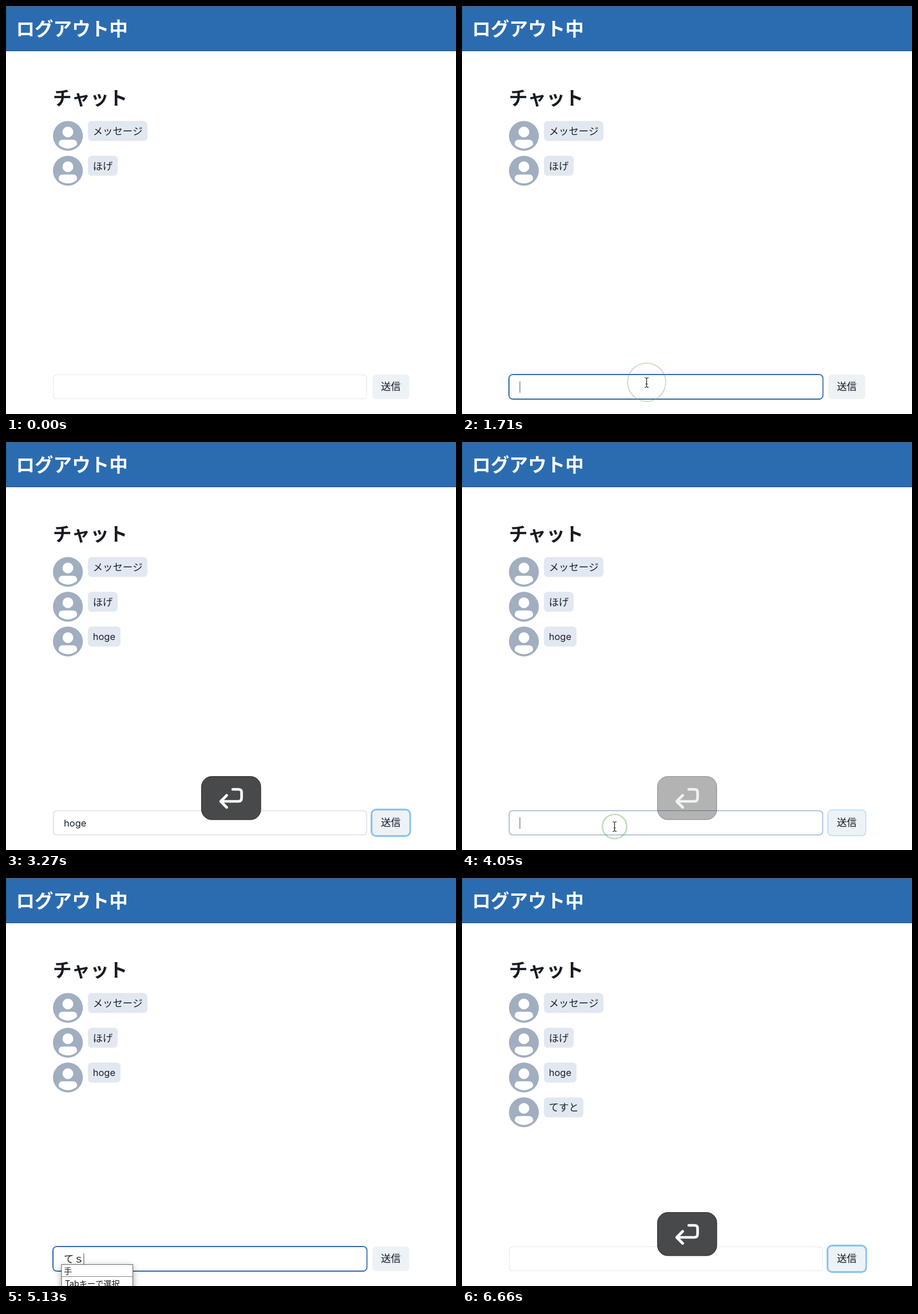
Animation, 786 px wide and 713 px high, one loop 6780 ms. Source, as an HTML page with a canvas:

```html
<!DOCTYPE html>
<html lang="ja">
<head>
<meta charset="utf-8">
<title>チャット</title>
<style>
html, body { margin: 0; width: 100%; height: 100%; overflow: hidden; background: #fff; }
canvas { display: block; }
</style>
</head>
<body>
<canvas id="stage" width="786" height="713"></canvas>
<script>
const ctx = document.getElementById('stage').getContext('2d');
const LOOP = 6780;
const JP = '"Noto Sans CJK JP", "Noto Sans CJK", sans-serif';
const LATIN = 'Inter, ' + JP;
const EM = 17.4;

const rows = [
  { text: 'メッセージ', w: 104, at: 0 },
  { text: 'ほげ', w: 52, at: 0 },
  { text: 'hoge', w: 57, at: 3210, latin: true },
  { text: 'てすと', w: 69, at: 6540 }
];

const typing = [
  [0, ''], [2460, 'h'], [2580, 'ho'], [2700, 'hog'], [2820, 'hoge'], [3360, ''],
  [4290, 'ｔ'], [4440, 'て'], [5070, 'てｓ'], [5400, 'てす'], [5610, 'てすｔ'],
  [5760, 'てすと'], [6630, '']
];

// Focus spans: [start, end]
const inputFocus = [[1470, 2970], [3960, 6270]];
const buttonFocus = [[2970, 3960], [6270, LOOP + 500]];
const hoverSpans = [[1230, 4290]];
const clicks = [[1470, 322.5, 657.5], [3960, 266.5, 672]];
const keyShows = [[3180, 3870], [6090, LOOP]];
const popup = { from: 4440, to: 6090 };

// Pointer keys: [time, x, y]; it hides while typing
const approach = [[540, 362, 722], [900, 324, 636], [1110, 322, 642], [1320, 322.5, 658], [2460, 322.5, 658]];
const comeback = [[3690, 322.5, 658], [3930, 266.5, 672], [4290, 266.5, 672]];

const clamp = v => Math.max(0, Math.min(1, v));
const lerp = (a, b, k) => a + (b - a) * k;
const ease = k => k * k * (3 - 2 * k);
const mix = (a, b, k) => a.map((v, i) => lerp(v, b[i], k));
const rgb = (c, a = 1) => `rgba(${c.map(Math.round)},${a})`;

// Strength of a 200 ms transition in and out of the given spans
function fade(spans, t) {
  return spans.reduce((m, [a, b]) =>
    Math.max(m, t < a ? 0 : t < b ? ease(clamp((t - a) / 200)) : 1 - ease(clamp((t - b) / 200))), 0);
}

function box(x, y, w, h, r, fill, stroke, lw = 1) {
  ctx.beginPath();
  ctx.roundRect(x, y, w, h, r);
  if (fill) { ctx.fillStyle = fill; ctx.fill(); }
  if (stroke) { ctx.strokeStyle = stroke; ctx.lineWidth = lw; ctx.stroke(); }
}

function label(text, x, y, size, weight, color, family = JP) {
  ctx.font = `${weight} ${size}px ${family}`;
  ctx.fillStyle = color;
  ctx.fillText(text, x, y);
  return ctx.measureText(text).width;
}

function header() {
  ctx.fillStyle = '#2b6cb0';
  ctx.fillRect(0, 0, 786, 79);
  ctx.fillStyle = 'rgba(20,60,110,.45)';
  ctx.fillRect(0, 78, 786, 1);
  ctx.fillRect(0, 0, 1, 79);
  ctx.fillStyle = '#575f6b';
  ctx.fillRect(0, 0, 786, 1);
  label('ログアウト中', 17.4, 52, 32.6, 700, '#fff');
  label('チャット', 82, 173, 32.6, 700, '#171b22');
}

const person = new Path2D('M103 102C93 112 79 118 64 118S35 112 25 102V95C25 87 32 80 41 80H87C96 80 103 87 103 95Z');
person.arc(64, 47, 23, 0, Math.PI * 2);

function message(row, i) {
  const y = 201 + i * 60.8;
  ctx.fillStyle = '#a0aec0';
  ctx.beginPath();
  ctx.arc(108.1, y + 26, 26.1, 0, Math.PI * 2);
  ctx.fill();
  ctx.save();
  ctx.translate(82, y);
  ctx.scale(.408, .408);
  ctx.fillStyle = '#fff';
  ctx.fill(person);
  ctx.restore();
  box(143, y, row.w, 34.8, 6.5, '#e2e8f0');
  if (row.latin) label(row.text, 151.7, y + 23.6, 16.5, 400, '#1a202c', LATIN);
  else label(row.text, 151.7, y + 23.8, EM, 300, '#1a202c');
}

function caretOn(t) {
  if (t >= 1470 && t < 2010 || t >= 2460 && t < 2970) return true;
  return t >= 3960 && t < 6270;
}

function field(t) {
  const k = fade(inputFocus, t);
  const base = mix([228, 232, 238], [203, 211, 224], fade(hoverSpans, t));
  const blue = [49, 104, 174];
  if (k > 0) box(82 - k / 2, 644 - k / 2, 548.5 + k, 43 + k, 7, null, rgb(blue, k), k);
  box(82.5, 644.5, 547.5, 42, 6, '#fff', rgb(mix(base, blue, k)), 1.1);

  let text = '';
  for (const [at, s] of typing) if (t >= at) text = s;
  const w = /[a-z]/.test(text)
    ? label(text, 101, 672, 16.5, 400, '#1a202c', LATIN)
    : label(text, 101, 672, EM, 300, '#1a202c');
  if (caretOn(t)) {
    ctx.fillStyle = '#777';
    ctx.fillRect(100.5 + w, 656, 1.3, 20);
  }
}

function button(t) {
  const k = fade(buttonFocus, t);
  if (k > 0) {
    const s = 3.2 * k;
    box(640 - s, 644 - s, 64.3 + 2 * s, 43 + 2 * s, 6.5 + s, rgb([66, 153, 225], .6 * k));
    box(640, 644, 64.3, 43, 6.5, '#fff');
  }
  box(640, 644, 64.3, 43, 6.5, '#edf2f7');
  label('送信', 654.7, 671.4, EM, 500, '#111722');
}

function candidates(t) {
  if (t < popup.from || t >= popup.to) return;
  ctx.save();
  ctx.shadowColor = 'rgba(0,0,0,.35)';
  ctx.shadowBlur = 12;
  ctx.shadowOffsetY = 4;
  ctx.fillStyle = '#fff';
  ctx.fillRect(97, 675, 125, 50);
  ctx.restore();
  ctx.strokeStyle = '#777';
  ctx.lineWidth = 1.2;
  ctx.strokeRect(97, 675.5, 124.5, 50);
  ctx.fillStyle = '#888';
  ctx.fillRect(97, 696, 124.5, 1);
  label(t < 5400 ? '手' : 'テスト', 101, 692, 14.2, 300, '#222');
  const w = label('Tab', 103, 713.5, 14.2, 400, '#111', LATIN);
  label('キーで選択', 103 + w, 713.5, 14.2, 400, '#111');
}

function returnKey(t) {
  const shown = keyShows.find(([a, b]) => t >= a && t < b + 310);
  if (!shown) return;
  ctx.save();
  ctx.globalAlpha = 1 - clamp((t - shown[1]) / 310);
  box(341.5, 584.5, 103.5, 75.5, 18, '#48494b', '#222', 1);
  ctx.restore();
  ctx.save();
  ctx.globalAlpha = Math.min(1, 2 * (1 - clamp((t - shown[1]) / 310)));
  ctx.strokeStyle = '#fff';
  ctx.lineWidth = 4.6;
  ctx.lineCap = ctx.lineJoin = 'round';
  ctx.stroke(new Path2D('M396 607H406Q411.5 607 411.5 612V622Q411.5 628 406 628H375M385.5 617.5L375 628L385.5 638.5'));
  ctx.restore();
}

function clickRing(t) {
  for (const [at, x, y] of clicks) {
    const age = t - at;
    if (age < 0 || age > 400) continue;
    ctx.strokeStyle = rgb([106, 176, 84], .42 * clamp((400 - age) / 160));
    ctx.lineWidth = Math.max(.8, 3.2 - age * .006);
    ctx.beginPath();
    ctx.arc(x, y, 14 + age * .08, 0, Math.PI * 2);
    ctx.stroke();
  }
}

function along(keys, t) {
  if (t < keys[0][0] || t >= keys[keys.length - 1][0]) return null;
  const i = keys.findIndex(k => t < k[0]);
  const [a, b] = [keys[i - 1], keys[i]];
  const k = ease((t - a[0]) / (b[0] - a[0]));
  return [lerp(a[1], b[1], k), lerp(a[2], b[2], k)];
}

const arrow = new Path2D('M0 0V14.2L3.3 11.2L5.8 17L8.4 15.9L5.9 10.2H10.3Z');
const beam = new Path2D('M-3.5 -8.5Q0 -8.5 0 -6Q0 -8.5 3.5 -8.5M0 -6V6M-3.5 8.5Q0 8.5 0 6Q0 8.5 3.5 8.5M-1.8 2.5H1.8');

function pointer(t) {
  const p = along(approach, t) || along(comeback, t);
  if (!p) return;
  ctx.save();
  ctx.translate(p[0], p[1]);
  ctx.lineJoin = 'round';
  if (p[1] > 644 && p[1] < 687) {
    ctx.strokeStyle = '#fff';
    ctx.lineWidth = 3;
    ctx.stroke(beam);
    ctx.strokeStyle = '#222';
    ctx.lineWidth = 1.2;
    ctx.stroke(beam);
  } else {
    ctx.shadowColor = 'rgba(0,0,0,.35)';
    ctx.shadowBlur = 3;
    ctx.shadowOffsetY = 1;
    ctx.strokeStyle = '#fff';
    ctx.lineWidth = 2;
    ctx.stroke(arrow);
    ctx.shadowColor = 'transparent';
    ctx.fillStyle = '#000';
    ctx.fill(arrow);
  }
  ctx.restore();
}

function draw(t) {
  ctx.fillStyle = '#fff';
  ctx.fillRect(0, 0, 786, 713);
  header();
  rows.forEach((row, i) => { if (t >= row.at) message(row, i); });
  field(t);
  button(t);
  candidates(t);
  returnKey(t);
  clickRing(t);
  pointer(t);
}

const start = performance.now();
function tick() {
  draw((performance.now() - start) % LOOP);
  requestAnimationFrame(tick);
}
tick();
</script>
</body>
</html>
```
